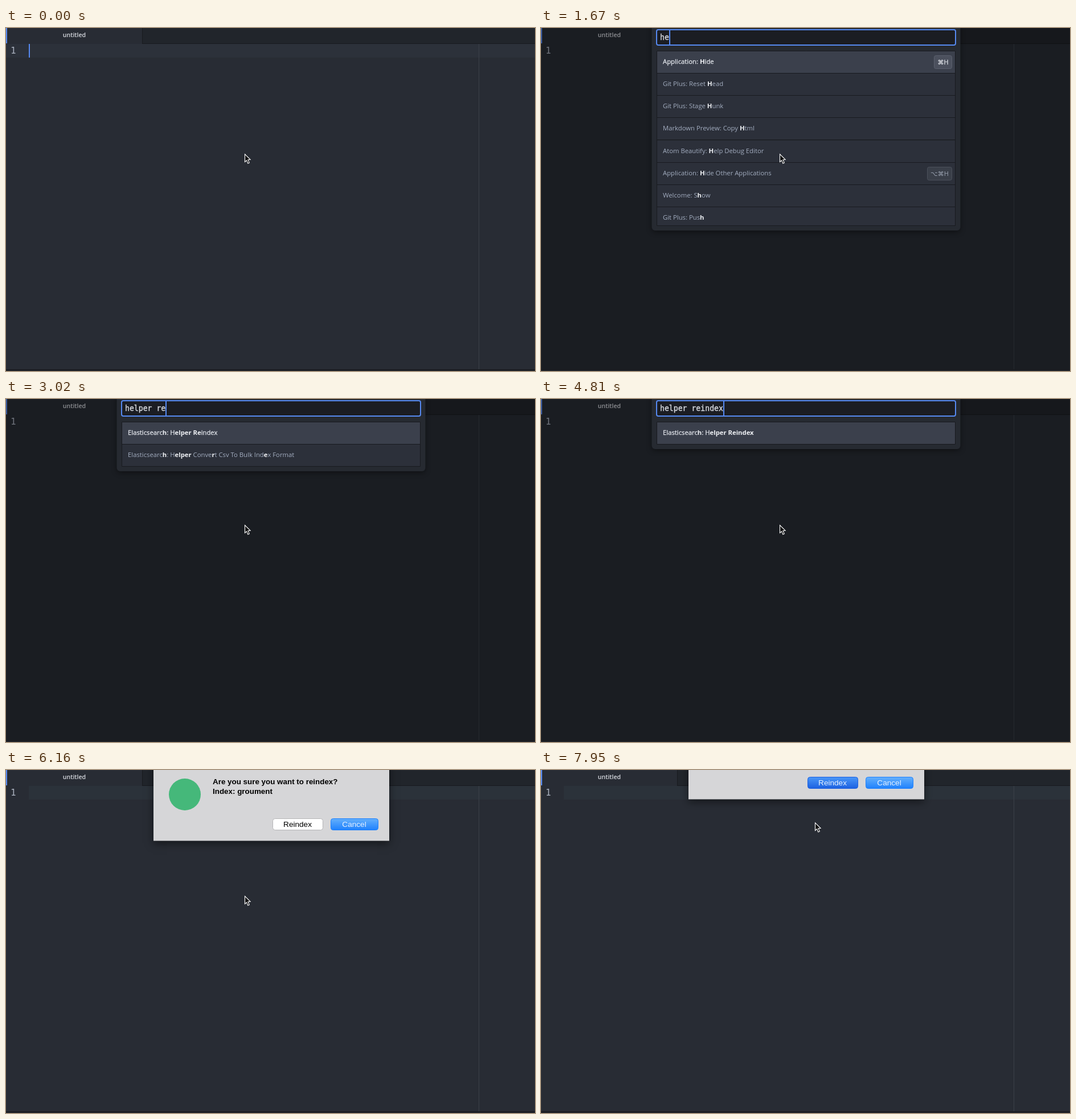
An HTML page with a canvas for the animation above (8 s loop, 929 by 603 pixels).

```html
<!DOCTYPE html>
<html lang="en">
<head>
<meta charset="utf-8">
<title>Command palette</title>
<style>
html, body { margin: 0; width: 100%; height: 100%; overflow: hidden; background: #282c34; }
canvas { display: block; }
</style>
</head>
<body>
<canvas id="stage" width="929" height="603"></canvas>
<script>
const ctx = document.getElementById('stage').getContext('2d');
const LOOP = 8000;
const BLUE = '#568af2';
const UI = '"Open Sans", "Noto Sans", "DejaVu Sans", sans-serif';
const MONO = '"DejaVu Sans Mono", monospace';
const ARIAL = '"Liberation Sans", Arial, sans-serif';

// Asterisks enclose matched letters; a shortcut follows the bar.
const allCommands = [
  'Application: About', 'Application: Add Project Folder|⇧⌘O',
  'Application: Bring All Windows To Front', 'Application: Hide|⌘H',
  'Application: Hide Other Applications|⌥⌘H', 'Application: Install Update',
  'Application: Minimize|⌘M', 'Application: New File|⌘N'
];
const hCommands = [
  'Application: *H*ide|⌘H', 'Git Plus: Reset *H*ead', 'Git Plus: Stage *H*unk',
  'Markdown Preview: Copy *H*tml', 'Atom Beautify: *H*elp Debug Editor',
  'Application: *H*ide Other Applications|⌥⌘H', 'Welcome: S*h*ow', 'Git Plus: Pus*h*'
];
const helper = 'Elasticsearc*h*: H*elper* ';
const helperCommands = ['Reindex', 'Bulk From File', 'Scan And Scroll',
  'Open Docs', 'Convert Csv To Bulk Index Format'].map(name => helper + name);
const reCommands = [helper + '*Re*index', helper + 'Conve*r*t Csv To Bulk Ind*e*x Format'];
const reindex = matched => [helper + '*' + 'Reindex'.slice(0, matched) + '*' + 'Reindex'.slice(matched)];

// start, query, caret visible, results
const palette = [
  [290, '', true, allCommands],
  [620, '', false, allCommands],
  [1070, '', true, allCommands],
  [1370, 'h', true, allCommands],
  [1520, 'h', true, hCommands],
  [1670, 'he', true, hCommands],
  [1970, 'hel', true, hCommands],
  [2120, 'helpe', true, helperCommands],
  [2270, 'helper', true, helperCommands],
  [2570, 'helper ', true, helperCommands],
  [2870, 'helper r', true, helperCommands],
  [3020, 'helper re', true, reCommands],
  [3470, 'helper re', false, reCommands],
  [3920, 'helper re', true, reCommands],
  [4070, 'helper rei', true, reindex(3)],
  [4210, 'helper rein', true, reindex(4)],
  [4360, 'helper reind', true, reindex(5)],
  [4510, 'helper reinde', true, reindex(6)],
  [4810, 'helper reindex', true, reindex(7)],
  [5260, 'helper reindex', false, reindex(7)],
  [5560, 'helper reindex', true, reindex(7)]
];
const PALETTE_END = 6160;
const dialogSteps = [[6010, -14], [6160, 0], [7950, -73]];
const pointerSteps = [[0, 0], [6760, 0.2], [6910, 0.6], [7050, 0.9], [7200, 1]];

const stepAt = (steps, t) => steps.filter(step => step[0] <= t).pop();
const mix = (a, b, k) => Math.round(a + (b - a) * k);

function rect(x, y, w, h, fill) {
  ctx.fillStyle = fill;
  ctx.fillRect(x, y, w, h);
}

function box(x, y, w, h, radius, fill, stroke, line = 1) {
  ctx.beginPath();
  ctx.roundRect(x + line / 2, y + line / 2, w - line, h - line, radius);
  ctx.fillStyle = fill;
  ctx.fill();
  if (!stroke) return;
  ctx.strokeStyle = stroke;
  ctx.lineWidth = line;
  ctx.stroke();
}

function withShadow(blur, dy, alpha, draw) {
  ctx.save();
  ctx.shadowColor = `rgba(0,0,0,${alpha})`;
  ctx.shadowBlur = blur;
  ctx.shadowOffsetY = dy;
  draw();
  ctx.restore();
}

// Returns the advance width; weight adds a hairline that leaves the width alone.
function text(str, x, y, font, color, align = 'left', weight = 0) {
  ctx.font = font;
  ctx.textAlign = align;
  ctx.fillStyle = ctx.strokeStyle = color;
  ctx.fillText(str, x, y);
  if (weight) {
    ctx.lineWidth = weight;
    ctx.strokeText(str, x, y);
  }
  return ctx.measureText(str).width;
}

function drawEditor(t) {
  const focused = t < 290;
  rect(0, 0, 929, 603, '#282c34');
  rect(239, 0, 690, 28, '#21252b');
  rect(239, 0, 1, 28, '#181a1f');
  rect(239, 27, 690, 1, '#181a1f');
  rect(0, 0, 2, 27, BLUE);
  text('untitled', 120, 16, '600 10.6px ' + UI, '#d7dae0', 'center');
  if (focused) rect(0, 28, 929, 24, '#2c313a');
  else if (t >= PALETTE_END) rect(40, 28, 889, 24, '#2b323a');
  rect(830, 28, 1, 572, '#3b4048');
  text('1', 8, 45, '16px ' + MONO, '#abb2bf');
  if (focused) rect(40, 28, 2, 24, BLUE);
  rect(0, 600, 929, 1, '#16181c');
  rect(0, 601, 929, 2, '#1f2228');
}

function drawRow(item, y, selected) {
  const [label, keys] = item.split('|');
  rect(204, y, 523, 39, selected ? '#3b404c' : '#2c303a');
  rect(204, y + 38, 523, 1, '#181a1f');
  let x = 214;
  label.split('*').forEach((run, i) => {
    const matched = i % 2;
    const color = matched ? '#f0f2f6' : selected ? '#e2e5eb' : '#a3adc0';
    x += text(run, x, y + 22, `${matched ? 700 : 400} 11.3px ${UI}`, color,
      'left', selected && !matched ? 0.3 : 0);
  });
  if (!keys) return;
  const w = keys.length === 2 ? 32 : 44;
  box(722 - w, y + 7, w, 24, 3, selected ? '#4b505d' : '#3a3f49', selected ? '#5b606d' : '#4b505b');
  text(keys, 722 - w / 2, y + 23, `11px "Open Sans", "DejaVu Sans", sans-serif`,
    selected ? '#dde0e6' : '#9da5b4', 'center', selected ? 0.3 : 0);
}

function drawPalette([, query, caret, items]) {
  rect(0, 0, 929, 600, 'rgba(0,0,0,0.35)');
  const listEnd = Math.min(348, Math.round(40 + items.length * 39.14) + 1);
  withShadow(10, 3, 0.4, () => box(194, -10, 543, listEnd + 18.5, 6, '#262a31'));
  box(202, 2, 527, 29, 3, '#1b1d23', BLUE, 2);
  text(query, 209, 21, '13.17px ' + MONO, '#d7dae0', 'left', 0.35);
  if (caret) rect(Math.round(209 + query.length * 7.93), 4, 2, 25, BLUE);

  ctx.save();
  ctx.beginPath();
  ctx.rect(203, 40, 525, listEnd - 40);
  ctx.clip();
  items.forEach((item, i) => drawRow(item, Math.round(41 + i * 39.14), i === 0));
  ctx.restore();
  box(203, 40, 525, listEnd - 40, 0, 'transparent', '#181a1f');
}

function drawButton(label, x, y, w, colors) {
  let fill = '#fff';
  if (colors) {
    fill = ctx.createLinearGradient(0, y, 0, y + 21);
    fill.addColorStop(0, colors[0]);
    fill.addColorStop(1, colors[1]);
  }
  box(x, y, w, 21, 4, fill, colors ? colors[1] : '#b4b4b6');
  text(label, x + w / 2 - 0.5, y + 15, '13.6px ' + ARIAL, colors ? '#e6f1ff' : '#000', 'center');
}

function drawDialog(t, dy) {
  withShadow(14, 4, 0.5, () => rect(259, dy - 30, 414, 154.5, '#d6d6d8'));
  ctx.beginPath();
  ctx.arc(314, 43 + dy, 28, 0, Math.PI * 2);
  ctx.fillStyle = '#45b87a';
  ctx.fill();
  const font = 'bold 13.4px ' + ARIAL;
  text('Are you sure you want to reindex?', 363, 25 + dy, font, '#000');
  text('Index: groument', 363, 42 + dy, font, '#000');
  drawButton('Reindex', 468, 85 + dy, 89, t >= 7950 && ['#4a98f9', '#1b5fe0']);
  drawButton('Cancel', 570, 85 + dy, 84, t >= 6160 && ['#66b1fc', '#1d80fd']);
}

function drawPointer(k) {
  ctx.save();
  ctx.translate(mix(419, 481, k) + 0.5, mix(221, 92, k) + 0.8);
  ctx.beginPath();
  [[0, 0], [0, 13.6], [3, 10.8], [5.3, 16.2], [7.8, 15.1], [5.5, 9.9], [9.6, 9.6]]
    .forEach(point => ctx.lineTo(...point));
  ctx.closePath();
  ctx.fillStyle = '#111';
  ctx.fill();
  ctx.strokeStyle = '#fff';
  ctx.lineWidth = 1.1;
  ctx.stroke();
  ctx.restore();
}

function frame() {
  const t = performance.now() % LOOP;
  drawEditor(t);
  const state = stepAt(palette, t);
  if (state && t < PALETTE_END) drawPalette(state);
  const slide = stepAt(dialogSteps, t);
  if (slide) drawDialog(t, slide[1]);
  drawPointer(stepAt(pointerSteps, t)[1]);
  requestAnimationFrame(frame);
}
frame();
</script>
</body>
</html>
```
